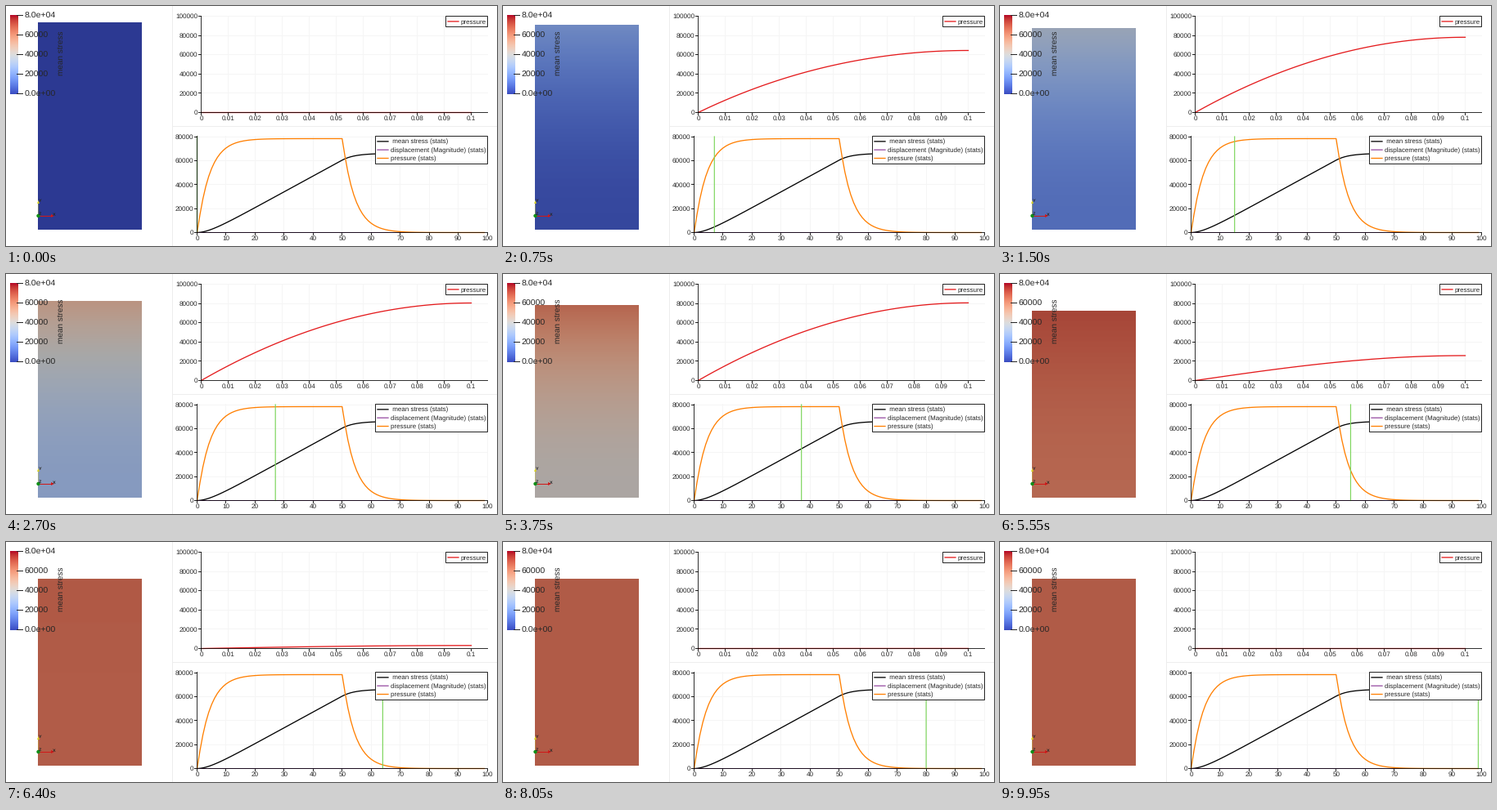
A matplotlib script for the animation above (10000 ms loop, 600 px wide and 294 px high).

```python
import numpy as np
import matplotlib.pyplot as plt
from matplotlib.animation import FuncAnimation
from matplotlib.patches import Circle, Polygon, Rectangle

W, H, DPI = 600, 294, 100
PX = 72 / DPI
FRAMES, INTERVAL = 200, 50

plt.rcParams["font.family"] = "Liberation Sans"
plt.rcParams["text.hinting"] = "none"
RED, ORANGE, PURPLE, GREEN = "#e41a1c", "#ff7f00", "#984ea3", "#7fd65f"
INK, GRID = "#262626", "#f5f5f5"

TAU, RAMP_END = 4.28, 50
P_MAX, LOAD_RATE = 80500, 1320
SHADE = 0.76

fig = plt.figure(figsize=(W / DPI, H / DPI), dpi=DPI, facecolor="white")
ax = fig.add_axes([0, 0, 1, 1])
ax.axis("off")


# Consolidation of a layer drained at u = 0 under a load ramp
def ramp_response(u, t):
    t = np.maximum(t, 0)
    total = 2 * u - u**2
    for n in range(1, 40, 2):
        mode = 32 / (np.pi * n) ** 3 * np.sin(n * np.pi * u / 2)
        total = total - mode * np.exp(-n * n * t / TAU)
    return total


def pressure(u, t):
    return P_MAX * (ramp_response(u, t) - ramp_response(u, t - RAMP_END))


def lagged_load(t):
    def lag(s):
        s = np.maximum(s, 0)
        return s - TAU * (1 - np.exp(-s / TAU))
    return LOAD_RATE * (lag(t) - lag(t - RAMP_END))


def stress(u, t):
    p = pressure(u, t)
    return LOAD_RATE * min(t, RAMP_END) + 0.28 * (p.mean() - p)


def rule(xs, ys, color="black", z=6, **kw):
    """Straight hairline, filling the pixel row or column that it names."""
    ax.plot(xs, ys, color=color, lw=PX, zorder=z, snap=True, **kw)


def curve(xs, ys, color, width=1.3, z=4):
    return ax.plot(xs, ys, color=color, lw=width * PX, zorder=z, snap=False)[0]


def label(x, y, text, size=8.1, ha="center", **kw):
    ax.text(x, y, text, fontsize=size * PX, ha=ha, va="center_baseline",
            color=INK, zorder=8, **kw)


def chart(x0, y0, right, top, xticks, yticks):
    """Grid, axis lines and tick labels; ticks are (pixel, text) pairs."""
    for x, text in xticks:
        rule([x, x], [top, y0], GRID, 1)
        rule([x, x], [y0 + 1, y0 + 3], INK)
        label(x + 0.5, y0 + 7, text)
    for y, text in yticks:
        rule([x0, right], [y, y], GRID, 1)
        rule([x0 - 3, x0], [y, y], INK)
        label(x0 - 3.5, y + 0.3, text, ha="right")
    rule([x0, right], [y0, y0], alpha=0.8)
    rule([x0, x0], [top, y0], alpha=0.8)


def legend(x, y, right, bottom, entries):
    ax.add_patch(Rectangle((x, y), right - x, bottom - y, fc="white",
                           ec=INK, lw=PX, zorder=7))
    for row, (text, color) in enumerate(entries):
        cy = y + 6.9 + 10.3 * row
        curve([x + 3, x + 16], [cy, cy], color, z=8)
        label(x + 18.5, cy, text, 7.95, "left")


# Pane separators
rule([203, 203], [0, H], "#ededed", 0)
rule([203, W], [147, 147], "#ededed", 0)

# Upper chart: pressure along the depth
depth = np.linspace(0, 1, 101)
chart(238, 130, 588, 12,
      [(238 + 33 * i, f"{i / 100:g}") for i in range(11)],
      [(130 - 23.6 * i, str(20000 * i)) for i in range(6)])
legend(537, 12, 588, 25, [("pressure", RED)])
profile = curve(238.5 + 330 * depth, 130.5 + 0 * depth, RED)

# Lower chart: values over time
X0, Y0 = 233.5, 277.5
XS, YS = 3.545, 117.5 / 80000
chart(233, 277, 588, 159,
      [(233 + 10 * XS * i, str(10 * i)) for i in range(11)],
      [(277 - 20000 * YS * i, str(20000 * i)) for i in range(5)])
legend(451, 159, 588, 193, [
    (" mean stress (stats)", "black"),
    ("displacement (Magnitude) (stats)", PURPLE),
    ("pressure (stats)", ORANGE)])
time = np.arange(0, 100)
curve(X0 + XS * time, Y0 - YS * lagged_load(time), "black")
curve(X0 + XS * time, Y0 + 0 * time, PURPLE, 1)
curve(X0 + XS * time, Y0 - YS * pressure(0.835, time), ORANGE)
cursor = curve([X0, X0], [160, Y0], GREEN, 1.2, z=5)

# Deforming body
LEFT, RIGHT, TOP, BOTTOM, TRAVEL = 39, 166, 20.3, 274, 24.8
cmap = plt.get_cmap("coolwarm")
rows = np.linspace(0, 1, 128)
body = ax.imshow(np.zeros((128, 1, 3)), extent=(LEFT, RIGHT, BOTTOM, TOP),
                 aspect="auto", interpolation="bilinear", zorder=2)

# Colour bar
ax.imshow(cmap(np.linspace(1, 0, 256))[:, None, :3], extent=(5, 15, 108, 11),
          aspect="auto", zorder=3)
for i, text in enumerate(["8.0e+04", "60000", "40000", "20000", "0.0e+00"]):
    y = 11 + 24.1 * i
    rule([13, 20], [y, y], INK)
    label(22.7, y + 0.2, text, 10.5, "left")
ax.text(67.7, 58, "mean stress", fontsize=10 * PX, rotation=90, color=INK,
        ha="center", va="center", zorder=8)

# Orientation axes
rule([40, 56], [256.6, 256.6], "#d01818", 5)
curve([39.5, 39.5], [241, 257], "#c8c840", 0.4, z=5)
ax.add_patch(Polygon([(55, 255), (59, 257), (55, 259)], fc="#d01818", zorder=6))
ax.add_patch(Polygon([(38, 242), (39.5, 238), (41, 242)], fc="#d8d020", zorder=6))
ax.add_patch(Circle((39.5, 257), 2.2, fc="#109018", zorder=6))
for x, y, name in [(58.5, 255, "X"), (41.5, 238.5, "Y"), (42, 254, "Z")]:
    label(x, y, name, 5.5, weight="bold")

ax.set_xlim(0, W)
ax.set_ylim(H, 0)


def update(frame):
    t = frame // 2
    profile.set_ydata(130.5 - 118.2 / 100000 * pressure(depth, t))
    x = X0 + XS * t
    cursor.set_xdata([x, x])
    body.set_data(cmap(stress(rows, t) / 80000)[:, None, :3] * SHADE)
    top = TOP + TRAVEL * min(t, RAMP_END) / RAMP_END
    body.set_extent((LEFT, RIGHT, BOTTOM, top))
    ax.set_xlim(0, W)
    ax.set_ylim(H, 0)
    return profile, cursor, body


anim = FuncAnimation(fig, update, frames=FRAMES, interval=INTERVAL,
                     repeat=True, repeat_delay=0, blit=False)
plt.show()
```
